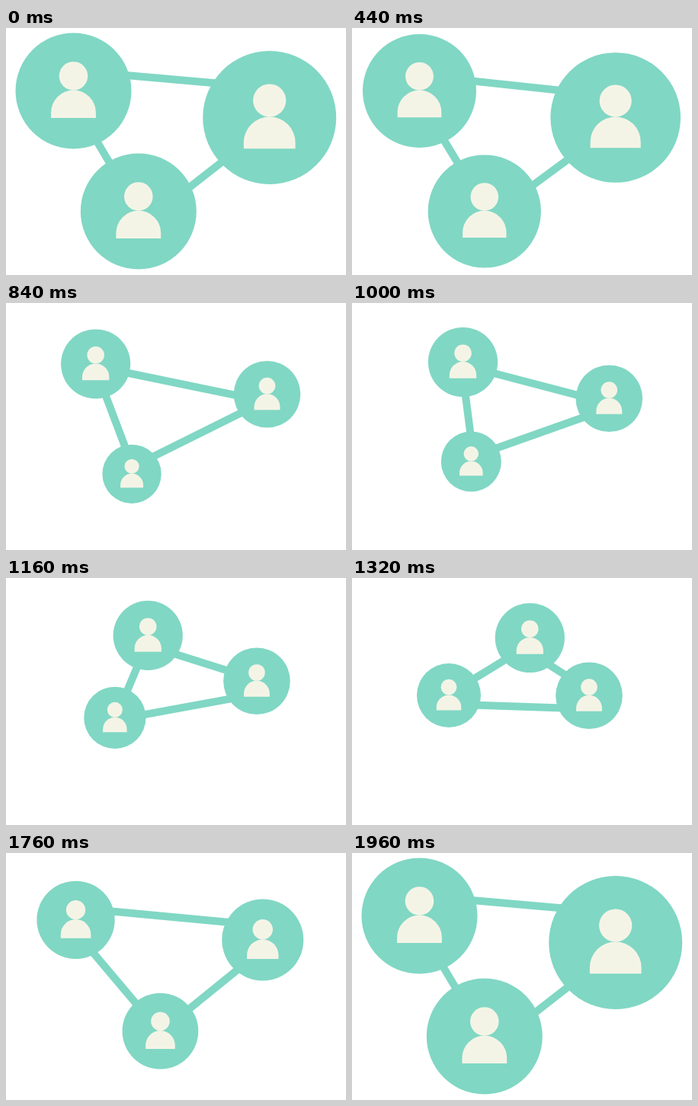
An HTML page with a canvas for the animation above (2.72 s loop, 446 by 324 pixels).

```html
<!DOCTYPE html>
<html lang="en">
<head>
<meta charset="utf-8">
<title>Connected people</title>
<style>
  html, body { margin: 0; width: 100%; height: 100%; overflow: hidden; background: #fff; }
  canvas { display: block; }
</style>
</head>
<body>
<canvas id="stage" width="446" height="324"></canvas>
<script>
const ctx = document.getElementById('stage').getContext('2d');
const TEAL = '#80d7c4', CREAM = '#f4f4e6';
const LOOP = 2720, STEP = 40, START = 400, END = 1960, RESIZE = 280;
const TIMES = [START, 440, 680, 1000, 1320, 1560, END];

// Each node travels to the next node's place; small is its radius on the way.
const NODES = [
  { from: 76, to: 87.5, small: [45.6, 45.6, 45.6, 45.6, 45.6, 45.6, 45.6],
    x: [88.5, 88.5, 99.5, 145.5, 233.3, 305.3, 345.7],
    y: [82.5, 82.5, 82.5, 77.5, 78.5, 102.8, 117.5] },
  { from: 87.5, to: 76, small: [43.8, 43.8, 43.8, 43.8, 43.8, 43.8, 43.8],
    x: [345.7, 345.7, 344.5, 337.3, 311, 253.5, 173.8],
    y: [117.5, 117.5, 118, 125.3, 154.3, 209.5, 240.5] },
  { from: 76, to: 76, small: [38, 38, 38.1, 39.5, 42, 44.4, 45.6],
    x: [173.8, 173.8, 170.5, 156.3, 127, 102.3, 88.5],
    y: [240.5, 240.5, 234.5, 208, 154, 107.5, 82.5] }
];

// Sideways shift of both ends of each link, measured from the node centres.
const LINKS = [
  { a: 0, b: 1, da: [-26.5, -20.3, 0, 3.9, 16.4, -5.6, -7.5],
                db: [-38.9, -27.8, 4.9, 6.3, -6.1, 11.7, -16.3] },
  { a: 1, b: 2, da: [-7.5, -7, -2.9, -12.1, -17.5, -5.5, 0],
                db: [-16.3, -10.1, 5.5, 5.5, -11.5, -13.5, -7.4] },
  { a: 2, b: 0, da: [0, 2.8, 4.2, 3.7, -1.4, -2.3, -26.5],
                db: [-7.4, -5.9, -2.1, -2.2, 7.7, 6, -38.9] }
];

const clamp = v => Math.min(1, Math.max(0, v));
const ease = u => (1 - Math.cos(Math.PI * clamp(u))) / 2;

function slope(v, i) {
  if (i === 0 || i === v.length - 1) return 0;
  const h1 = TIMES[i] - TIMES[i - 1], h2 = TIMES[i + 1] - TIMES[i];
  return ((v[i] - v[i - 1]) / h1 * h2 + (v[i + 1] - v[i]) / h2 * h1) / (h1 + h2);
}

// Smooth cubic curve through the values in v at TIMES.
function along(v, t) {
  if (t <= START) return v[0];
  if (t >= END) return v[v.length - 1];
  let i = 0;
  while (t >= TIMES[i + 1]) i++;
  const h = TIMES[i + 1] - TIMES[i], u = (t - TIMES[i]) / h, w = 1 - u;
  return w * w * (1 + 2 * u) * v[i] + u * u * (3 - 2 * u) * v[i + 1]
    + h * u * w * (w * slope(v, i) - u * slope(v, i + 1));
}

function place(node, t) {
  const small = along(node.small, t);
  const shrink = 1 - ease((t - START) / RESIZE);
  const grow = ease((t - END + RESIZE) / RESIZE);
  return {
    x: along(node.x, t),
    y: along(node.y, t),
    r: small + (node.from - small) * shrink + (node.to - small) * grow
  };
}

function disc(x, y, r, color) {
  ctx.fillStyle = color;
  ctx.beginPath();
  ctx.arc(x, y, r, 0, 2 * Math.PI);
  ctx.fill();
}

function drawLink(link, spots, t) {
  const p = spots[link.a], q = spots[link.b];
  const dx = q.x - p.x, dy = q.y - p.y, len = Math.hypot(dx, dy);
  const nx = -dy / len, ny = dx / len;
  const da = along(link.da, t), db = along(link.db, t);
  ctx.beginPath();
  ctx.moveTo(p.x + nx * da, p.y + ny * da);
  ctx.lineTo(q.x + nx * db, q.y + ny * db);
  ctx.stroke();
}

function drawPerson({ x, y, r }) {
  disc(x, y, r, TEAL);
  disc(x, y - 0.257 * r, 0.247 * r, CREAM);
  const half = 0.387 * r, base = y + 0.467 * r;
  ctx.beginPath();
  ctx.moveTo(x - half, base);
  ctx.arc(x, y - 0.013 * r + half, half, Math.PI, 2 * Math.PI);
  ctx.lineTo(x + half, base);
  ctx.fill();
}

function draw(t) {
  const spots = NODES.map(n => place(n, t));
  ctx.fillStyle = '#fff';
  ctx.fillRect(0, 0, 446, 324);
  ctx.strokeStyle = TEAL;
  ctx.lineWidth = 10;
  LINKS.forEach(l => drawLink(l, spots, t));
  spots.forEach(drawPerson);
}

const begin = performance.now();
function tick() {
  const t = (performance.now() - begin) % LOOP;
  draw(Math.floor(t / STEP) * STEP);
  requestAnimationFrame(tick);
}
tick();
</script>
</body>
</html>
```
